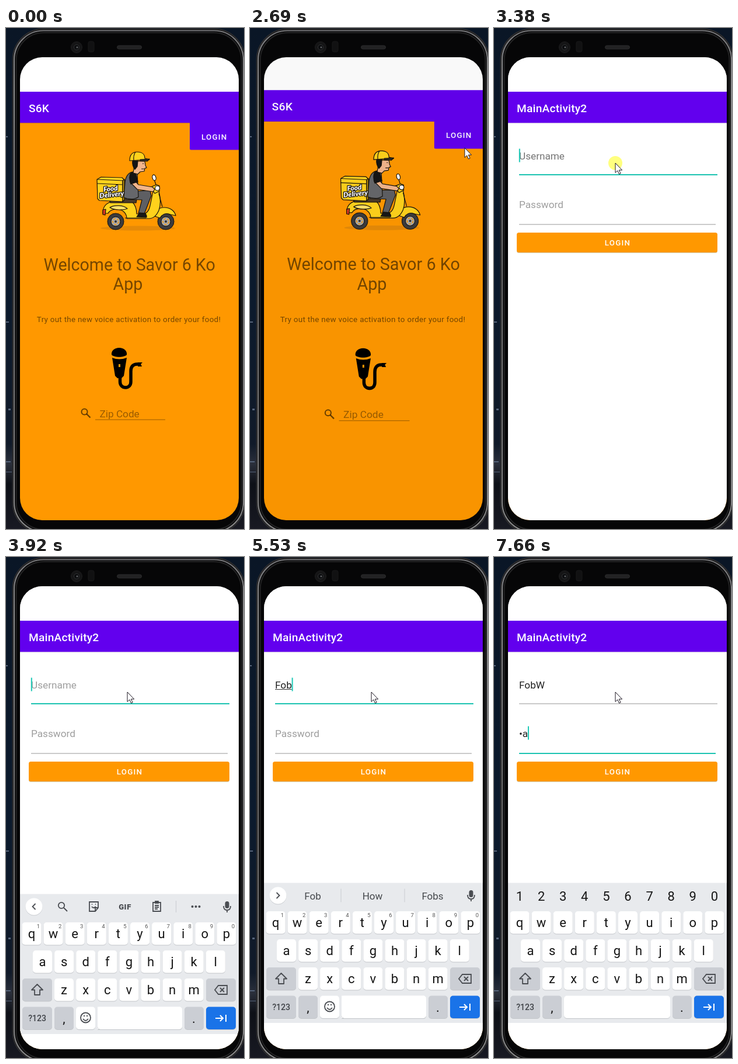
These frames come from a looping animation (408x857 px, 7990 ms). An HTML page:

```html
<!DOCTYPE html>
<html lang="en">
<head>
<meta charset="utf-8">
<title>Food order app login</title>
<style>
html, body { margin: 0; width: 100%; height: 100%; overflow: hidden; background: #0a1320; }
svg { display: block; width: 408px; height: 857px; font-family: Roboto, Arial, sans-serif; }
.mid { text-anchor: middle; }
.title { font-size: 19.1px; font-weight: 500; letter-spacing: .0125em; fill: #fff; }
.button { font-size: 13.35px; font-weight: 500; letter-spacing: .089em; fill: #fff; }
.field { font-size: 17.2px; fill: #222; }
.hint { font-size: 17.2px; fill: #9e9e9e; }
.letter { font-size: 22px; fill: #151515; text-anchor: middle; }
.sup { font-size: 9.5px; fill: #555; text-anchor: middle; }
.word { font-size: 17px; fill: #45484c; text-anchor: middle; }
.icon { fill: none; stroke: #4a4d52; stroke-width: 1.8; }
.ink { stroke: #17130c; stroke-width: 1.2; stroke-linejoin: round; }
</style>
</head>
<body>
<svg viewBox="0 0 408 857">
  <defs>
    <linearGradient id="night" x2="0" y2="1">
      <stop offset="0" stop-color="#0a1626"/><stop offset=".5" stop-color="#0b1a2d"/>
      <stop offset=".83" stop-color="#101a29"/><stop offset=".87" stop-color="#2a2f3b"/>
      <stop offset=".91" stop-color="#0d1017"/><stop offset="1" stop-color="#181922"/>
    </linearGradient>
    <linearGradient id="metal" x2="0" y2="1">
      <stop offset="0" stop-color="#77777a"/><stop offset=".12" stop-color="#8b8b8c"/>
      <stop offset=".5" stop-color="#6b6b6c"/><stop offset="1" stop-color="#858586"/>
    </linearGradient>
    <linearGradient id="shade" x2="0" y2="1">
      <stop stop-opacity=".13"/><stop offset="1" stop-opacity="0"/>
    </linearGradient>
    <clipPath id="glass"><rect x="24" y="50" width="375" height="792" rx="38"/></clipPath>
  </defs>

  <rect width="408" height="857" fill="url(#night)"/>
  <g fill="#56647a">
    <rect y="185" width="3" height="2"/><rect y="502" width="5" height="2"/>
    <rect x="4" y="651" width="4" height="3"/><rect y="741" width="8" height="2"/><rect y="759" width="10" height="1"/>
  </g>

  <!-- phone -->
  <rect x="11.500" y="1.500" width="398" height="863" rx="53" fill="#060607" stroke="#2c2c2e" stroke-width="2"/>
  <rect x="14" y="4.500" width="393" height="857" rx="50" fill="#060607" stroke="url(#metal)" stroke-width="2.200"/>
  <rect x="17.500" y="8" width="386" height="850" rx="47" fill="#060607" stroke="#232324" stroke-width="2"/>
  <circle cx="121" cy="33" r="9.500" fill="#151516" stroke="#1e1e1f"/>
  <circle cx="121" cy="33" r="4.500" fill="#0b0c0e" stroke="#303234"/>
  <circle cx="122" cy="33" r="1.600" fill="#5b5d60"/>
  <rect x="141" y="23" width="10" height="18" rx="3" fill="#111112" stroke="#181819"/>
  <rect x="190.500" y="30" width="42" height="6" rx="3" fill="#222223" stroke="#2b2b2c"/>

  <g clip-path="url(#glass)">
    <g id="home">
      <rect x="24" y="50" width="375" height="60" fill="#fff"/>
      <rect x="24" y="162" width="375" height="680" fill="#ff9800"/>
      <rect x="24" y="162" width="375" height="2" fill="url(#shade)"/>
      <rect x="24" y="109" width="375" height="53.300" fill="#6200ee"/>
      <text class="title" x="39" y="143.500">S6K</text>
      <path d="M315 162h84v46.500h-82q-2 0-2-2z" fill="#6200ee"/>
      <text class="button" x="335" y="190.500">LOGIN</text>

      <!-- courier on a scooter -->
      <ellipse cx="226" cy="342.500" rx="64" ry="4" fill="#e58a08"/>
      <g id="wheels"></g>
      <g class="ink" fill="#ffd21c">
        <path d="M255 322c0-10 7-15 16-15 11 0 18 6 20 14l-9-2c-9-4-15 1-18 6z"/>
        <path d="M166 317c0-12 6-18 16-20h34c6 6 8 14 8 21h10c7 0 11-5 13-14l5-24 6-4 4 3c3 12 4 22 0 33-4 9-9 14-17 14h-38c0-10-8-16-17-16-8 0-13 3-15 7z"/>
        <path d="M178 307c8-5 24-4 30 2-7 3-22 3-30-2z" fill="#ffe168"/>
        <path d="M170 320l-4-1v-8l5-1z" fill="#e03a24"/>
        <path d="M176 293q22-6 48 0l-1 6h-44z" fill="#4a3a2a"/>
        <path d="M248 272l10-4 5 2v9l-8 4z"/>
        <circle cx="259.500" cy="274" r="4" fill="#fff"/>
        <path d="M257 268l-3-9" fill="none"/>
        <ellipse cx="254" cy="256" rx="3" ry="5" transform="rotate(-14 254 256)" fill="#fff"/>
        <path d="M262 283l6 23M204 325h36" fill="none"/>
      </g>
      <g class="ink">
        <path d="M156 259l7-4 36 1 4 4v34l-4 3-39-2-3-3z" fill="#ffd21c"/>
        <path d="M156 259l44 2v36M156 266l44 2" fill="none"/>
        <path d="M200 261l3-2v35l-3 3z" fill="#c99a0c"/>
      </g>
      <g class="mid" font-family="Lato, sans-serif" font-size="11.800" font-weight="900" font-style="italic"
         fill="#fff" stroke="#17130c" stroke-width="2.400" stroke-linejoin="round" paint-order="stroke"
         transform="rotate(-6 180 282)">
        <text x="180" y="279">Food</text><text x="181" y="289">Delivery</text>
      </g>
      <g class="ink">
        <path d="M205 280l42-2 2 9-12 31-10-1 6-23-27-1z" fill="#5e5f63"/>
        <path d="M229 316l10 1 2 4v3l-17-1z" fill="#171717"/>
        <path d="M217 246c-9 2-12 9-13 18l-2 26c10 4 19 3 25-1l-2-40z" fill="#66676b"/>
        <path d="M219 259l8 9 24 4 4 4-3 4-27-4-12-12z" fill="#f2b58c"/>
        <path d="M215 247c-4 3-4 13-1 20l12-4-4-15z" fill="#141414"/>
        <path d="M221 228h17l1 7 2 4-3 1-1 5-7 1-4 4-8-2z" fill="#f2b58c"/>
        <path d="M217 227h9l-1 10-4 5c-3-4-5-9-4-15z" fill="#151515"/>
        <path d="M212 227c0-10 5-15 13-15 8 0 13 4 13 11l8 2-5 2-14-1z" fill="#ffd21c"/>
        <path d="M230 225l16-1-4 4-12-1z" fill="#33302a"/>
        <path d="M222 212q-4 6-3 14M234 232h2M232 241h5" fill="none"/>
      </g>

      <g fill-opacity=".54">
        <text x="64.500" y="414.500" font-size="28.600">Welcome to Savor 6 Ko</text>
        <text class="mid" x="209" y="448" font-size="28.600">App</text>
        <text class="mid" x="210.500" y="502.500" font-size="13.350" letter-spacing=".3">Try out the new voice activation to order your food!</text>
      </g>
      <path d="M181 559c-1-7 5-12 13-12s14 5 13 12c-5 5-21 5-26 0z"/>
      <path d="M182 564q12 5 25 0l-5 31-4 4h-7l-4-4z"/>
      <path d="M193 575h3v5h-3z" fill="#ff9800"/>
      <path d="M195.500 596v9c0 6 4 10 9.500 10s9-4 9-10v-18c0-8 4-12 11-12h6" fill="none" stroke="#000" stroke-width="5.500"/>
      <path d="M226 572h8l-3 3 2 4h-7z"/>
      <g fill="none" stroke="#000" stroke-opacity=".58">
        <circle cx="134.500" cy="656.500" r="5" stroke-width="2"/><path d="M138 660l6.500 6.500" stroke-width="2.400"/>
        <path d="M153 670h120" stroke-opacity=".4"/>
      </g>
      <text x="160.500" y="665.500" font-size="17.200" fill-opacity=".4">Zip Code</text>
    </g>
    <rect id="dim" x="24" y="50" width="375" height="792" opacity="0"/>

    <g id="login">
      <rect x="24" y="50" width="375" height="792" fill="#fff"/>
      <rect x="24" y="162" width="375" height="2" fill="url(#shade)"/>
      <rect x="24" y="109" width="375" height="53.300" fill="#6200ee"/>
      <text class="title" x="39" y="143.500">MainActivity2</text>
      <text id="userHint" class="hint" x="43" y="224.500">Username</text>
      <text id="passHint" class="hint" x="43" y="307.500">Password</text>
      <text id="user" class="field" x="43" y="224.500"></text>
      <text id="pass" class="field" x="43" y="307.500"></text>
      <path id="mark" fill="none" stroke="#333"/>
      <path id="userLine" d="M43 251h340"/>
      <path id="passLine" d="M43 336h337"/>
      <rect id="caret" width="2" height="23" fill="#1cc9b6"/>
      <rect x="39" y="351" width="344" height="34" rx="3.500" opacity=".18"/>
      <rect x="39" y="350" width="344" height="34" rx="3.500" fill="#ff9800"/>
      <text class="button mid" x="212" y="372">LOGIN</text>
    </g>
    <g id="keyboard"></g>
  </g>

  <circle id="halo" r="12" fill="#ff0"/>
  <path id="pointer" d="M0 0v16.500l3.800-3.500 2.700 6 2.600-1.200-2.700-5.700h5.200z" fill="#fff" stroke="#1a1420" stroke-linejoin="round"/>
</svg>

<script>
const LOOP = 7990, TICK = 70;
const $ = id => document.getElementById(id);
const show = (id, on) => $(id).style.display = on ? '' : 'none';
const move = (id, x, y) => $(id).setAttribute('transform', `translate(${x} ${y})`);
const within = (t, a, b) => t >= a && t < b;
const clamp = v => Math.max(0, Math.min(1, v));
const last = (rows, t) => rows.filter(r => r[0] <= t).pop();

$('wheels').innerHTML = [188, 274].map(x =>
  `<circle cx="${x}" cy="331" r="14" fill="#3b3b3d" stroke="#17130c"/>
   <circle cx="${x}" cy="331" r="8" fill="#a9aaad" stroke="#17130c"/>
   <circle cx="${x}" cy="331" r="5" fill="none" stroke="#e79a1c" stroke-width="2" stroke-dasharray="4 2.300"/>
   <circle cx="${x}" cy="331" r="2" fill="#333"/>`).join('');

// keyboard
const PITCH = 37.1;
const key = (x, y, w, fill = '#fff') =>
  `<rect x="${x}" y="${y + 1}" width="${w}" height="38.500" rx="5" fill="#c3c6ca"/>
   <rect x="${x}" y="${y}" width="${w}" height="38.500" rx="5" fill="${fill}"/>`;
const row = (letters, x, y) => [...letters].map((c, i) =>
  key(x - 16.5 + i * PITCH, y, 33) +
  `<text class="letter key" x="${x + i * PITCH}" y="${y + 26.5}">${c}</text>`).join('');
const each = (s, f) => [...s].map(f).join('');
const GREY = '#cbced4';

$('keyboard').innerHTML = `
  <rect x="24" y="557.500" width="375" height="390" fill="#fff"/>
  <rect x="24" y="557.500" width="375" height="239.500" fill="#e8eaed"/>
  ${row('qwertyuiop', 44, 606)}${row('asdfghjkl', 62.5, 654)}${row('zxcvbnm', 99.5, 702)}
  ${key(28, 702, 51, GREY)}${key(343, 702, 51, GREY)}
  ${key(28, 750.5, 51, GREY)}${key(83, 750.5, 33, GREY)}${key(306, 750.5, 33, GREY)}
  ${key(343, 750.5, 51, '#1a73e8')}${key(120, 750.5, 182)}
  <path id="shift" class="icon" d="M53.500 712l-9.500 9.500h5v8.500h9v-8.500h5z" stroke-linejoin="round"/>
  <path class="icon" d="M364 714h15v15h-15l-6-7.500zM367 718l7 7m0-7l-7 7"/>
  <path d="M359 770h13m-5-5l5 5-5 5M377 764v12" fill="none" stroke="#fff" stroke-width="2"/>
  <text class="mid" x="53.500" y="775" font-size="14" font-weight="500" fill="#3f4247">?123</text>
  <text class="letter" x="99.500" y="778">,</text><text class="letter" x="322" y="778">.</text>
  <g id="plain">
    ${each('1234567890', (c, i) => `<text class="sup" x="${55.5 + i * PITCH}" y="616">${c}</text>`)}
    <rect x="118" y="748" width="39" height="44" fill="#e8eaed"/>
    ${key(120, 750.5, 33)}${key(157, 750.5, 145)}
    <g class="icon"><circle cx="136.500" cy="769" r="8.500"/><path d="M132 771q4.500 6 9 0M133 766h2m3 0h2"/></g>
    <circle cx="48" cy="580" r="14.500" fill="#c9ccd0"/><circle cx="48" cy="579" r="14.500" fill="#fff"/>
    <path id="chevron" class="icon"/>
    <rect x="375.500" y="570" width="7" height="12" rx="3.500" fill="#4a4d52"/>
    <path class="icon" d="M373 578q0 7 6 7t6-7M379 585v4"/>
  </g>
  <g id="tools">
    <g class="icon"><circle cx="95" cy="577" r="5.200"/><path d="M99 581l6 6M143 571h15v10l-5 6h-10zM158 581h-5v6M147 579q3 4 7 0M147 575h1m5 0h1"/>
    <path d="M252 572h13v15h-13zM256 570h5v3h-5zM255 577h7m-7 3h7m-7 3h5"/></g>
    <text class="mid" x="204" y="583.500" font-size="13" font-weight="900" letter-spacing=".6" fill="#4a4d52">GIF</text>
    <path d="M291.500 569v20" stroke="#c9ccd0"/>
    <g fill="#4a4d52"><circle cx="319.500" cy="579" r="2"/><circle cx="325.500" cy="579" r="2"/><circle cx="331.500" cy="579" r="2"/></g>
  </g>
  <g id="words">
    <path d="M156 567.500v23M265 567.500v23" stroke="#c9ccd0"/>
    ${[107.5, 210, 313].map(x => `<text class="word" x="${x}" y="585.500"></text>`).join('')}
  </g>
  <g id="digits">${each('1234567890', (c, i) => `<text class="letter" x="${44 + i * PITCH}" y="587.500">${c}</text>`)}</g>`;

const letters = [...document.querySelectorAll('.key')];
const words = [...document.querySelectorAll('.word')];

// start, ticks, then start, control and end points of each pointer sweep
const SWEEPS = [
  [650, 6, 158, 848, -95, 814, 11, 623],
  [1400, 6, 11, 623, 270, 295, 366, 173],
  [2080, 4, 366, 173, 367, 192, 368, 205],
  [2900, 6, 368, 205, 270, 215, 208, 231]
];
const TYPED = [[0, ''], [4730, 'F'], [5200, 'Fo'], [5330, 'Fob'], [6060, 'FobW']];
const SECRET = [[0, ''], [7460, 's'], [7660, '•a']];
// time, underlined characters, suggestions
const GUESSES = [
  [0, 0, []], [4930, 1, ['F', 'For', 'Found']], [5330, 2, ['Fo', 'For', 'Food']],
  [5530, 3, ['Fob', 'How', 'Fobs']], [6260, 4, ['FobW', 'Why', 'Fobs']]
];
const RISE = [[0, 300], [3850, 80], [3920, 19], [4000, 0]];

function pointerAt(t) {
  const [start, ticks, ax, ay, bx, by, cx, cy] = last(SWEEPS, t);
  const u = Math.min(1, Math.floor((t - start) / TICK) / ticks);
  const mix = (a, b, c) => (1 - u) ** 2 * a + 2 * u * (1 - u) * b + u * u * c;
  return [mix(ax, bx, cx), mix(ay, by, cy)];
}

const cubic = (s, a, b, c, d) =>
  (1 - s) ** 3 * a + 3 * s * (1 - s) ** 2 * b + 3 * s * s * (1 - s) * c + s ** 3 * d;

// quick start with a very long settle, made of two joined curves
function settle(u) {
  const [xs, ys] = u < 1 / 6
    ? [[0, .05, .1333, 1 / 6], [0, 0, .06, .4]]
    : [[1 / 6, .2083, .25, 1], [.4, .82, 1, 1]];
  let lo = 0, hi = 1;
  for (let i = 0; i < 24; i++) {
    const s = (lo + hi) / 2;
    if (cubic(s, ...xs) < u) lo = s; else hi = s;
  }
  return cubic(hi, ...ys);
}

function zoom(id, s) {
  $(id).setAttribute('transform', `translate(211.5 446) scale(${s}) translate(-211.5 -446)`);
}

function drawScreens(t) {
  const ms = 50 + TICK * Math.floor((t - 2690) / TICK);
  const p = t < 2690 ? 0 : settle(clamp(ms / 400));
  zoom('home', 1 + .05 * p);
  zoom('login', .85 + .15 * p);
  $('dim').setAttribute('opacity', .155 * p);
  $('login').setAttribute('opacity', clamp((ms - 50) / 50));
}

function drawLine(id, on) {
  $(id).setAttribute('stroke', on ? '#1cc3b1' : '#959595');
  $(id).setAttribute('stroke-width', on ? 1.8 : 1.2);
}

function drawFields(t) {
  const onUser = within(t, 3380, 6740), onPass = t >= 6740;
  const name = last(TYPED, t)[1], secret = last(SECRET, t)[1];
  $('user').textContent = name;
  $('pass').textContent = secret;
  show('userHint', !name);
  show('passHint', !secret);
  $('userHint').style.fill = within(t, 3380, 3580) ? '#757575' : '';
  drawLine('userLine', onUser);
  drawLine('passLine', onPass);

  const marked = onUser ? last(GUESSES, t)[1] : 0;
  const width = marked ? $('user').getSubStringLength(0, marked) : 0;
  $('mark').setAttribute('d', marked ? `M43 226.500h${width}` : '');

  const text = onPass ? secret : name;
  const end = text ? $(onPass ? 'pass' : 'user').getComputedTextLength() : 0;
  show('caret', (onUser || onPass) && !within(t, 4140, 4650) && !within(t, 7260, 7460));
  move('caret', 42.8 + end, onPass ? 289.5 : 206.5);
}

function drawKeyboard(t) {
  show('keyboard', t >= 3850);
  move('keyboard', 0, last(RISE, t)[1]);
  const caps = within(t, 4650, 4730) || within(t, 5990, 6060);
  for (const el of letters) {
    const c = el.textContent;
    el.textContent = caps ? c.toUpperCase() : c.toLowerCase();
  }
  $('shift').style.fill = caps ? '#4a4d52' : '';
  const guessing = t >= 4930, numeric = t >= 6810;
  show('plain', !numeric);
  show('tools', !guessing);
  show('words', guessing && !numeric);
  show('digits', numeric);
  $('chevron').setAttribute('d', guessing ? 'M45.500 574l5 5-5 5' : 'M50.500 574l-5 5 5 5');
  last(GUESSES, t)[2].forEach((w, i) => words[i].textContent = w);
}

function drawPointer(t) {
  show('pointer', t >= 650);
  const click = within(t, 2430, 2620) || within(t, 3310, 3580);
  const fading = within(t, 2620, 2690) || within(t, 3580, 3650);
  show('halo', click || fading);
  if (t < 650) return;
  const [x, y] = pointerAt(t);
  move('pointer', x, y);
  move('halo', x, y);
  $('halo').setAttribute('opacity', click ? .5 : .2);
}

const began = performance.now();
function frame() {
  const t = (performance.now() - began) % LOOP;
  drawScreens(t);
  drawFields(t);
  drawKeyboard(t);
  drawPointer(t);
  requestAnimationFrame(frame);
}
frame();
</script>
</body>
</html>
```
